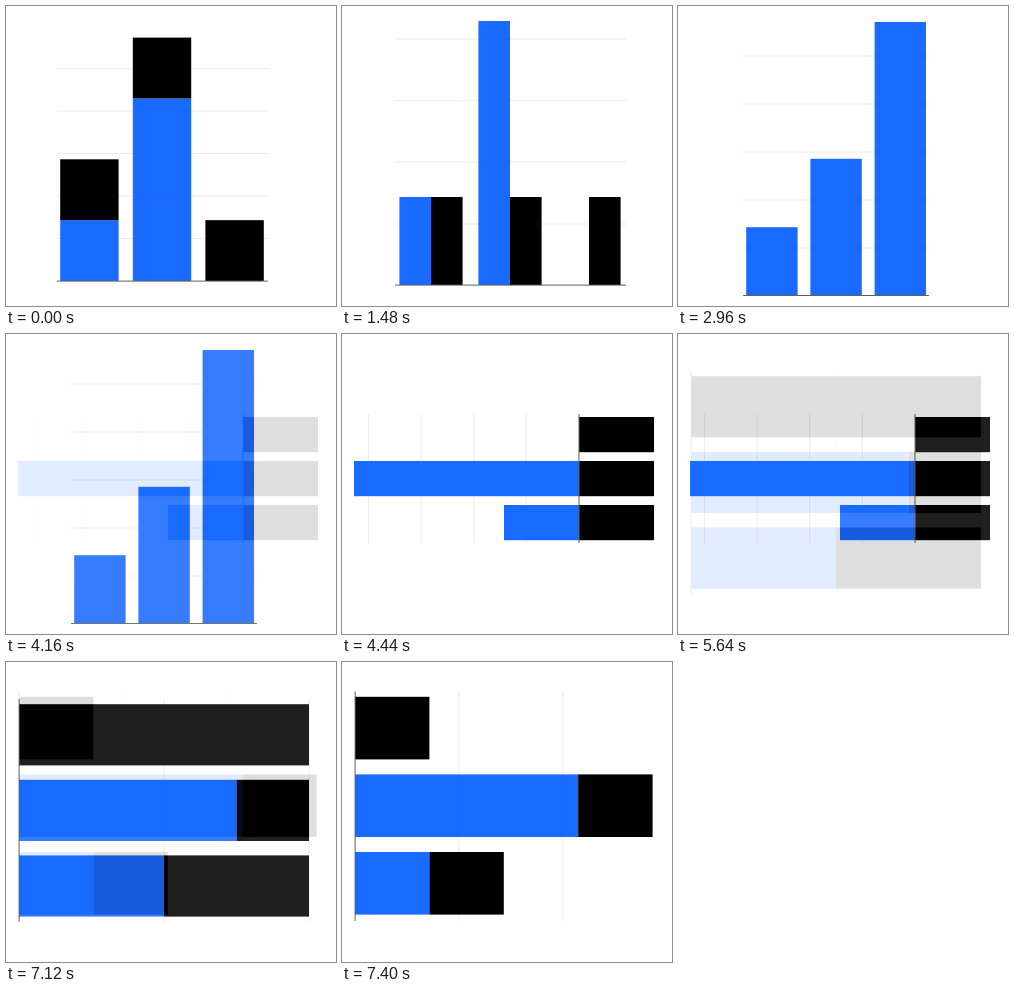
A matplotlib script that plays this animation: 330x300 px, repeating every 8 s.

```python
import numpy as np
import matplotlib.pyplot as plt
from matplotlib.animation import FuncAnimation

W, H = 330, 300
STEP_MS, TOTAL = 40, 200
CYCLE, FADE = 37, 8          # frames per chart, steps in a dissolve
BLUE, BLACK = (26, 106, 255), (0, 0, 0)
GRID, AXIS = (236, 236, 236), (96, 96, 96)


def coverage(lo, hi, size):
    """Share of each pixel along one axis that lies between lo and hi."""
    px = np.arange(size)
    return np.clip(np.minimum(hi, px + 1) - np.maximum(lo, px), 0, 1)


def rect(img, x0, y0, x1, y1, color):
    cover = np.outer(coverage(y0, y1, H), coverage(x0, x1, W))[..., None]
    img += cover * (np.array(color) / 255 - img)


def columns(span, base, grid, bars):
    """Vertical bars: (left, right, bottom, top, color)."""
    img = np.ones((H, W, 3))
    for y in grid:
        rect(img, span[0], y, span[1], y + 1, GRID)
    for left, right, bottom, top, color in bars:
        rect(img, left, top, right, bottom, color)
    rect(img, span[0], base, span[1], base + 1, AXIS)
    return img


def rows(span, base, grid, bars):
    """Horizontal bars: (top, bottom, left, right, color)."""
    img = np.ones((H, W, 3))
    for x in grid:
        rect(img, x, span[0], x + 1, span[1], GRID)
    for top, bottom, left, right, color in bars:
        rect(img, left, top, right, bottom, color)
    rect(img, base, span[0], base + 1, span[1], AXIS)
    return img


def stacked_columns():
    base, unit = 275, 60.85
    bars = []
    for i, (blue, black) in enumerate([(1, 1), (3, 1), (0, 1)]):
        x = 54.2 + 72.6 * i
        mid = base - unit * blue
        bars += [(x, x + 58.4, base, mid, BLUE),
                 (x, x + 58.4, mid, mid - unit * black, BLACK)]
    return columns((51, 262), 274.6, [62, 104.5, 147, 189.5, 232], bars)


def grouped_columns():
    base, unit = 279, 88
    bars = []
    for i, blue in enumerate([1, 3, 0]):
        x = 57.4 + 79 * i
        bars += [(x, x + 31.6, base, base - unit * blue, BLUE),
                 (x + 31.6, x + 63.2, base, base - unit, BLACK)]
    return columns((53, 284), 278.6, [32.5, 94, 155.5, 217.5], bars)


def single_columns():
    base, unit = 289.6, 68.4
    bars = [(68.2 + 64.2 * i, 119.6 + 64.2 * i, base, base - unit * v, BLUE)
            for i, v in enumerate([1, 2, 4])]
    return columns((65, 251), 289, [49.5 + 48 * i for i in range(5)], bars)


def diverging_rows():
    base, unit = 237, 75
    bars = []
    for i, blue in enumerate([0, 3, 1]):
        y = 83 + 44 * i
        bars += [(y, y + 35.2, base - unit * blue, base, BLUE),
                 (y, y + 35.2, base, base + unit, BLACK)]
    return rows((80, 209), 236.5, [26 + 52.6 * i for i in range(4)], bars)


def stacked_rows(top, pitch, height, span, grid, widths):
    bars = []
    for i, (blue, total) in enumerate(widths):
        y = top + pitch * i
        bars += [(y, y + height, 13, 13 + blue, BLUE),
                 (y, y + height, 13 + blue, 13 + total, BLACK)]
    return rows(span, 12.6, grid, bars)


charts = [
    stacked_columns(),
    grouped_columns(),
    single_columns(),
    diverging_rows(),
    stacked_rows(42.2, 75.6, 61.2, (37, 260), [157.5, 302.5],
                 [(0, 290), (217.5, 290), (145, 290)]),
    stacked_rows(34.8, 77.6, 62.6, (29.5, 259), [116.5, 220.5],
                 [(0, 74.4), (223.2, 297.6), (74.4, 148.8)]),
]

fig = plt.figure(figsize=(W / 100, H / 100), dpi=100, facecolor="white")
picture = fig.figimage(charts[0], origin="upper")


def update(frame):
    index, phase = divmod(frame, CYCLE)
    img = charts[index]
    mix = max(0, phase - (CYCLE - FADE)) / FADE
    if mix:
        img = (1 - mix) * img + mix * charts[index + 1]
    picture.set_data(np.clip(img, 0, 1))
    return [picture]


anim = FuncAnimation(fig, update, frames=TOTAL, interval=STEP_MS,
                     repeat=True, repeat_delay=0, blit=False)
plt.show()
```
